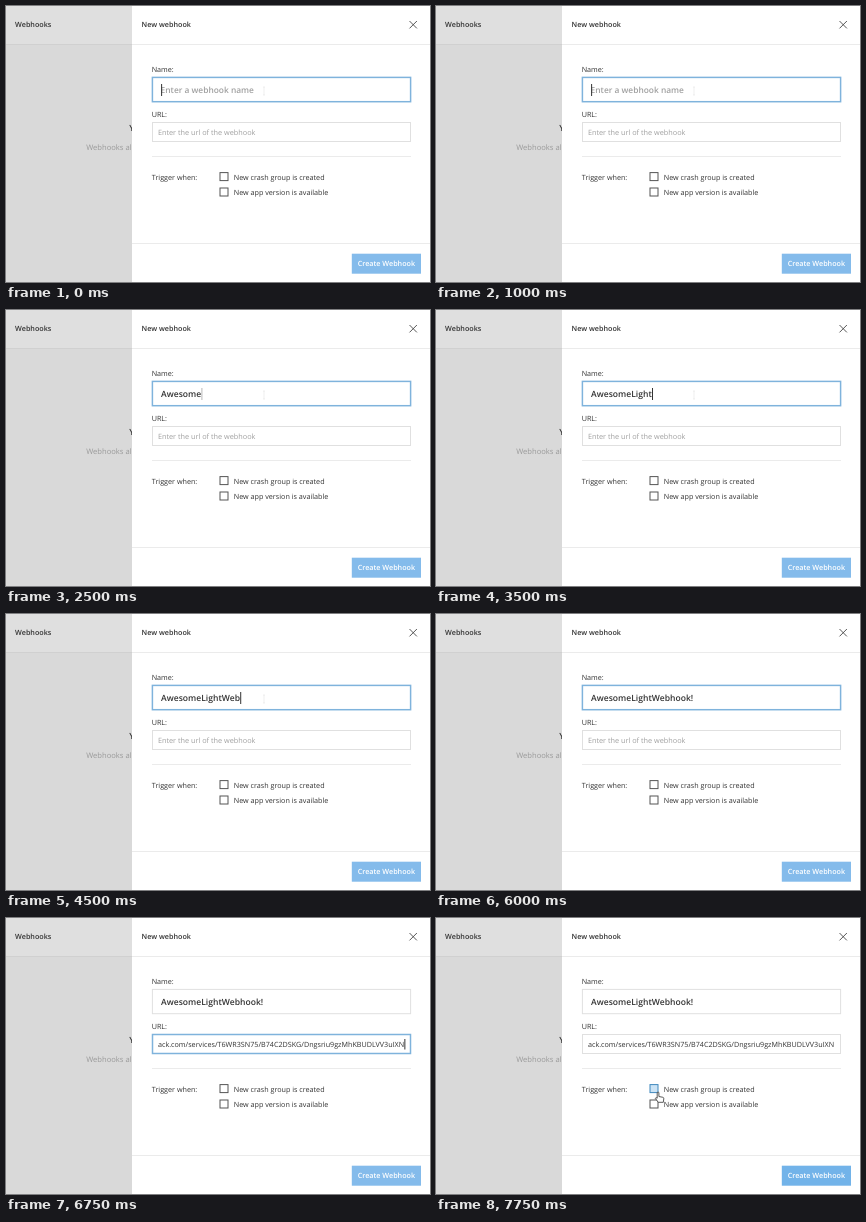
Animation of 424x276 px, one loop 8000 ms. Source, as an HTML page:

```html
<!DOCTYPE html>
<html lang="en">
<head>
<meta charset="utf-8">
<title>New webhook</title>
<style>
  html, body { margin: 0; width: 100%; height: 100%; overflow: hidden; background: #fff; }
  svg { display: block; width: 100vw; height: 100vh; }
  text {
    font: 7.2px "Open Sans", "Noto Sans", sans-serif;
    fill: #333;
    text-rendering: geometricPrecision;
    white-space: pre;
  }
  .strong { font-weight: 600; }
  .name { font-size: 8.57px; font-weight: 600; }
  .url { font-size: 7.2px; }
  .hint { fill: #a0a0a0; }
  .rule { stroke: #ebebeb; }
  .field { fill: #fff; stroke: #e0e0e0; stroke-width: 1; }
  .field.focus { stroke: #7fb3dc; stroke-width: 1.5; }
  .box { fill: #fff; stroke: #555; stroke-width: 1; }
  .box.active { fill: #cbe3f5; stroke: #3f88bd; }
  .caret { fill: #333; }
  #button { fill: #84bbeb; }
  #button.ready { fill: #72b3e9; }
</style>
</head>
<body>
<svg viewBox="0 0 424 276" preserveAspectRatio="none">
  <!-- dimmed page -->
  <rect width="126" height="276" fill="#d9d9d9"/>
  <rect width="126" height="38" fill="#dfdfdf"/>
  <path d="M0 38.5H126" stroke="#d0d0d0"/>
  <text class="strong" x="9.1" y="21.2">Webhooks</text>
  <text class="strong" x="123.2" y="124.6" style="font-size:8.5px">You</text>
  <text x="80.2" y="144.2" style="font-size:7.6px;fill:#999">Webhooks allow</text>

  <!-- panel -->
  <rect x="126" width="298" height="276" fill="#fff"/>
  <path class="rule" d="M126 38.5H424M126 237.5H424M146 150.5H405"/>
  <text class="strong" x="135.6" y="21.2">New webhook</text>
  <path d="M403.5 15l7.4 7.4m0-7.4l-7.4 7.4" stroke="#444" stroke-width=".9" fill="none"/>

  <text x="145.7" y="66">Name:</text>
  <rect id="nameField" class="field" x="146.4" y="71.4" width="258.2" height="24.3"/>
  <text id="nameHint" class="name hint" x="154.6" y="87" style="font-size:8.4px">Enter a webhook name</text>
  <text id="nameText" class="name" x="155.1" y="87"></text>
  <rect id="nameCaret" class="caret" y="78" width="1" height="12"/>

  <text x="145.7" y="111">URL:</text>
  <rect id="urlField" class="field" x="146.5" y="116.5" width="258" height="19"/>
  <text id="urlHint" class="url hint" x="151.9" y="129.1" style="font-size:7.3px">Enter the url of the webhook</text>
  <text id="urlText" class="url" x="152" y="129.1">ack.com/services/T6WR3SN75/B74C2DSKG/Dngsriu9gzMhKBUDLVV3uIXN</text>
  <rect id="urlCaret" class="caret" y="121" width="1" height="10.5"/>

  <text x="145.8" y="173.6">Trigger when:</text>
  <rect id="crashBox" class="box" x="214" y="166.6" width="8" height="8"/>
  <text x="227.8" y="173.6">New crash group is created</text>
  <rect class="box" x="214" y="182" width="8" height="8"/>
  <text x="227.8" y="189">New app version is available</text>

  <rect id="button" x="345.8" y="247.7" width="69.2" height="20"/>
  <text class="strong" x="351.7" y="260.4" style="fill:#fff">Create Webhook</text>

  <!-- pointers -->
  <path id="beam" d="M-1 -4.5h2M0 -4.5v8M-1 3.5h2" stroke="#ddd" stroke-width=".5" fill="none"/>
  <path id="hand" d="M-.8 .5q.9-1 1.7 0v4l4 .8q1 .3 .9 1.4l-.5 3.6h-5l-3-4q.2-1.2 1.9-.1z"
        fill="#fff" stroke="#333" stroke-width=".8" stroke-linejoin="round"/>
</svg>
<script>
  const LOOP = 8000;
  const NAME = "AwesomeLightWebhook!";
  const $ = id => document.getElementById(id);

  // Each step changes part of the state; the rest carries over.
  const steps = [
    [0, { typed: 0, caret: 1, focus: "name", pasted: false, beam: [258, 85.5], hand: null, pressed: false, ready: false }],
    [500, { caret: 0 }],
    [750, { caret: .4 }],
    [1000, { caret: 1 }],
    [1250, { caret: .2 }],
    [1500, { typed: 1, caret: 1 }],
    [1750, { typed: 4 }],
    [2000, { typed: 7 }],
    [2500, { caret: .35 }],
    [2750, { typed: 8, caret: 1 }],
    [3000, { typed: 9 }],
    [3250, { typed: 11 }],
    [3500, { typed: 12 }],
    [4000, { typed: 13 }],
    [4250, { typed: 14 }],
    [4500, { typed: 15 }],
    [4750, { typed: 17 }],
    [5000, { typed: 18 }],
    [5250, { typed: 19, beam: null }],
    [5500, { typed: 20, caret: 0 }],
    [6250, { focus: "url", caret: 1 }],
    [6500, { pasted: true }],
    [7000, { caret: 0 }],
    [7250, { beam: [246, 130] }],
    [7500, { beam: null, hand: [222, 174] }],
    [7750, { focus: "", pressed: true, ready: true }]
  ];

  const show = (el, on) => { el.style.display = on ? "" : "none"; };

  function placePointer(el, at) {
    show(el, at);
    if (at) el.setAttribute("transform", `translate(${at})`);
  }

  function placeCaret(el, text, filled, opacity) {
    const end = filled ? text.getComputedTextLength() + .2 : 0;
    el.setAttribute("x", text.x.baseVal[0].value + end);
    el.style.opacity = opacity;
  }

  function render(s) {
    const inName = s.focus === "name", inUrl = s.focus === "url";
    $("nameText").textContent = NAME.slice(0, s.typed);
    show($("nameHint"), !s.typed);
    show($("urlHint"), !s.pasted);
    show($("urlText"), s.pasted);
    $("nameField").classList.toggle("focus", inName);
    $("urlField").classList.toggle("focus", inUrl);
    placeCaret($("nameCaret"), $("nameText"), s.typed, inName ? s.caret : 0);
    placeCaret($("urlCaret"), $("urlText"), s.pasted, inUrl ? s.caret : 0);
    $("crashBox").classList.toggle("active", s.pressed);
    $("button").classList.toggle("ready", s.ready);
    placePointer($("beam"), s.beam);
    placePointer($("hand"), s.hand);
  }

  function frame() {
    const t = performance.now() % LOOP;
    const past = steps.filter(([at]) => at <= t).map(([, change]) => change);
    render(Object.assign({}, ...past));
    requestAnimationFrame(frame);
  }
  frame();
</script>
</body>
</html>
```
